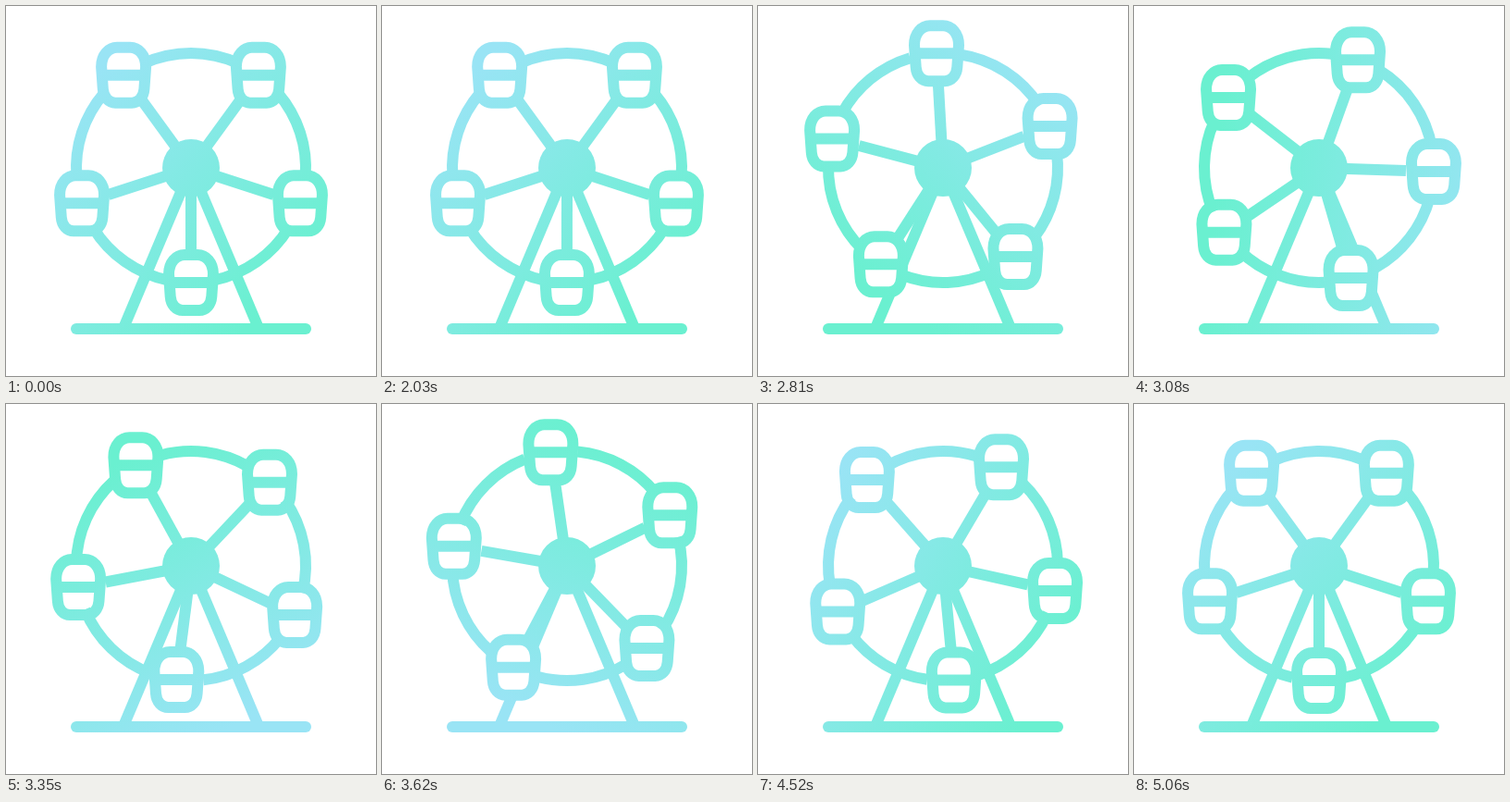
Write an HTML page with a canvas that moves like this. It is 400 by 400 pixels and loops after 5090 ms.

```html
<!DOCTYPE html>
<html lang="en">
<head>
<meta charset="utf-8">
<title>Ferris wheel</title>
<style>
  html, body { margin: 0; width: 100%; height: 100%; overflow: hidden; background: #fff; }
  canvas { display: block; width: 400px; height: 400px; }
</style>
</head>
<body>
<canvas id="stage"></canvas>
<script>
const LOOP = 5090, HOLD = 2030, STEP = 30;
const SPIN_START = 2003, SPIN_TIME = 3087, SPIN_TURN = 144;
const CX = 200, CY = 175, RING = 124, SPOKE = 94, HUB = 31, LINE = 12;
const RAD = Math.PI / 180;

// Gaps left in the ring on both sides of each cabin, clockwise from the bottom (degrees)
const NEAR = 11.6, FAR = 13.4;
const GAPS = [[NEAR, NEAR], [FAR, FAR], [FAR, NEAR], [NEAR, FAR], [FAR, FAR]];

const cabin = new Path2D(
  'M-24 -9 C-24 -22 -16 -30 -7 -30 H7 C16 -30 24 -22 24 -9 ' +
  'L22.3 15 C21.7 24 16 30 9 30 H-9 C-16 30 -21.7 24 -22.3 15 Z');

const canvas = document.getElementById('stage');
const ctx = canvas.getContext('2d');
const dpr = window.devicePixelRatio || 1;
canvas.width = canvas.height = 400 * dpr;

function bezier(x, x1, y1, x2, y2) {
  const at = (t, a, b) => 3 * t * (1 - t) * (1 - t) * a + 3 * t * t * (1 - t) * b + t * t * t;
  let lo = 0, hi = 1;
  for (let i = 0; i < 30; i++) {
    const mid = (lo + hi) / 2;
    if (at(mid, x1, x2) < x) lo = mid; else hi = mid;
  }
  return at((lo + hi) / 2, y1, y2);
}

function progress(time) {
  if (time < HOLD) return 0;
  const t = HOLD + Math.floor((time - HOLD) / STEP) * STEP;
  return bezier((t - SPIN_START) / SPIN_TIME, 0.336, 0, 0.42, 1);
}

// The gradient turns once and swings out to the right on its way
function paint(turn) {
  const a = (225 + turn) * RAD;
  const dx = Math.cos(a) * 155, dy = Math.sin(a) * 155;
  const cx = 200 + 45 * Math.max(0, Math.cos(a)), cy = 187;
  const g = ctx.createLinearGradient(cx + dx, cy + dy, cx - dx, cy - dy);
  g.addColorStop(0, '#99e4f5');
  g.addColorStop(1, '#6af0d0');
  return g;
}

function line(x1, y1, x2, y2, cap = 'butt') {
  ctx.lineCap = cap;
  ctx.beginPath();
  ctx.moveTo(x1, y1);
  ctx.lineTo(x2, y2);
  ctx.stroke();
}

function draw(time) {
  const p = progress(time);
  const color = paint(p * 360);
  const angles = GAPS.map((_, i) => 90 + i * 72 + p * SPIN_TURN);
  const point = (deg, r) => [CX + r * Math.cos(deg * RAD), CY + r * Math.sin(deg * RAD)];
  const seats = angles.map(deg => {
    const [x, y] = point(deg, RING);
    const path = new Path2D();
    path.addPath(cabin, new DOMMatrix([1, 0, 0, 1, x, y]));
    return { x, y, path };
  });

  ctx.setTransform(dpr, 0, 0, dpr, 0, 0);
  ctx.fillStyle = '#fff';
  ctx.fillRect(0, 0, 400, 400);
  ctx.strokeStyle = color;
  ctx.lineWidth = LINE;

  line(CX, CY, 127.5, 347);
  line(CX, CY, 272.5, 347);
  line(76, 349, 324, 349, 'round');

  // Cabins hide the legs behind them
  seats.forEach(s => ctx.fill(s.path));

  ctx.lineCap = 'butt';
  angles.forEach((deg, i) => {
    const next = GAPS[(i + 1) % 5];
    ctx.beginPath();
    ctx.arc(CX, CY, RING, (deg + GAPS[i][1]) * RAD, (deg + 72 - next[0]) * RAD);
    ctx.stroke();
    line(CX, CY, ...point(deg, SPOKE));
  });

  ctx.fillStyle = color;
  ctx.beginPath();
  ctx.arc(CX, CY, HUB, 0, Math.PI * 2);
  ctx.fill();

  seats.forEach(({ x, y, path }) => {
    ctx.stroke(path);
    line(x - 24, y, x + 24, y);
  });
}

const start = performance.now();
function tick() {
  draw((performance.now() - start) % LOOP);
  requestAnimationFrame(tick);
}
tick();
</script>
</body>
</html>
```
